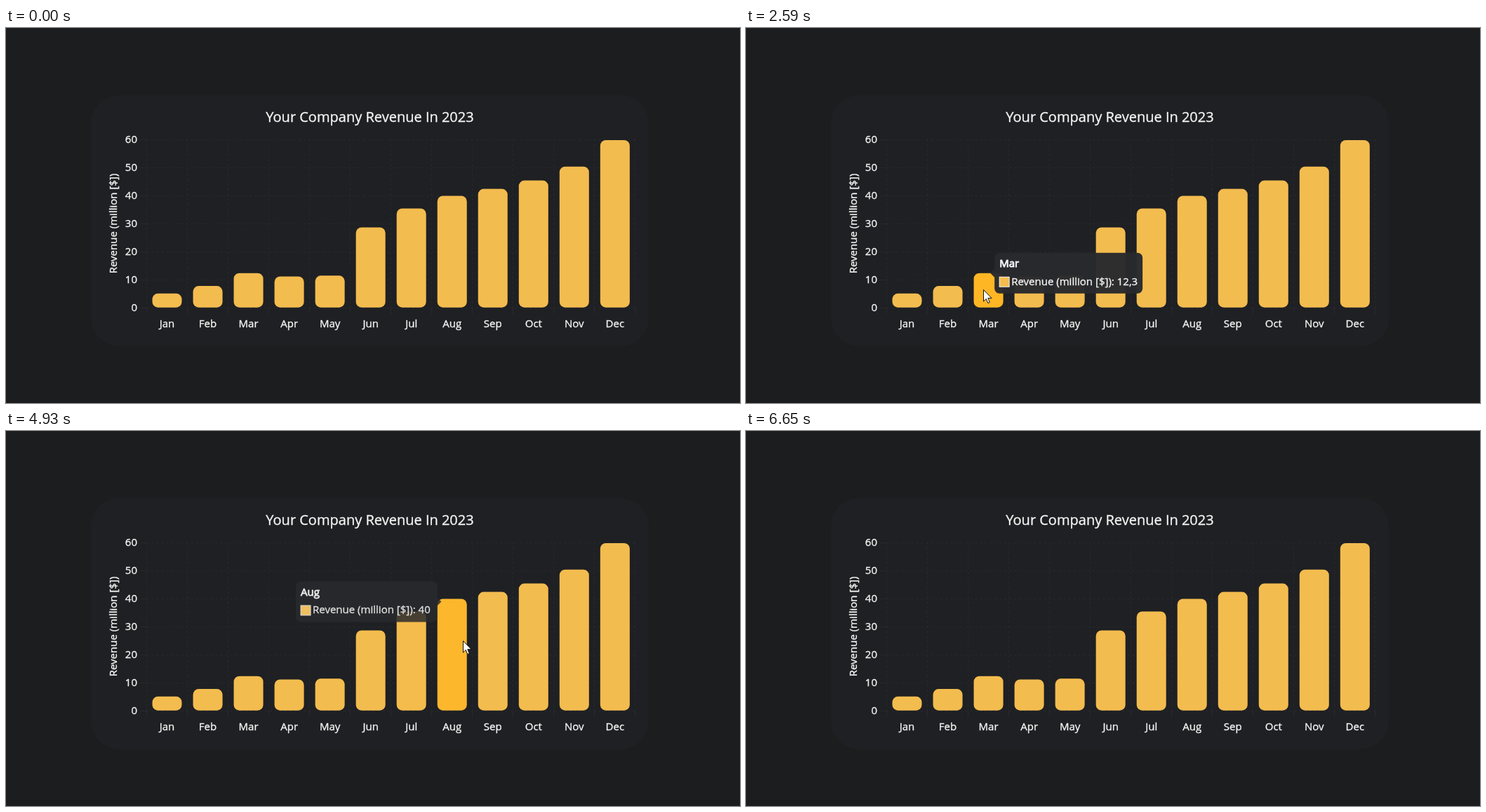
Recreate the animation shown at these times as an HTML page with a canvas. Size 1046 by 535 pixels, loop 7710 ms.

```html
<!DOCTYPE html>
<html lang="en">
<head>
<meta charset="utf-8">
<title>Revenue chart</title>
<style>
  html, body { margin: 0; width: 100%; height: 100%; overflow: hidden; background: #1c1d1e; }
  canvas { display: block; }
</style>
</head>
<body>
<canvas id="stage" width="1046" height="535"></canvas>
<script>
const ctx = document.getElementById('stage').getContext('2d');
const LOOP = 7710, TICK = 68.5;
const ENTER = 400, EXIT = 6600;
const MOVE_STARTS = [ENTER, 3140, 4710];
const FONT = '"Open Sans", "Noto Sans", sans-serif';
const LABEL = 'Revenue (million [$])';
const MONTHS = 'Jan Feb Mar Apr May Jun Jul Aug Sep Oct Nov Dec'.split(' ');
const VALUES = [5, 7.7, 12.3, 11.1, 11.4, 28.7, 35.5, 40, 42.5, 45.5, 50.5, 60];
const BASE = 398.7, LEFT = 200.5, STEP = 58.03, UNIT = 3.98;
const HALF_BAR = 21, HALF_TIP = 29, CARET_GAP = 8.6;
const BAR = [243, 188, 79], BAR_HOT = [255, 182, 36];

// Key points of the pointer: time, x, y
const PATH = [
  [400, 955, 520], [1150, 421, 467], [1750, 301, 426], [1970, 322, 396],
  [2106, 324.6, 385], [2181, 337, 374], [3140, 340, 372], [3290, 367, 349],
  [3345, 424, 301], [3500, 490, 276], [3770, 557, 276], [3893, 591, 300],
  [4710, 591, 300], [4790, 600, 299], [4915, 651, 299], [5015, 673, 300],
  [5350, 715, 306], [5395, 755, 308], [5575, 773, 307], [5669, 824, 306],
  [6060, 831, 314], [6265, 847, 328], [6560, 1001, 481]
];

const centre = i => LEFT + STEP * (i + 0.5);
const barTop = i => BASE - VALUES[i] * UNIT;
const linear = p => p;
const outQuart = p => 1 - (1 - p) ** 4;

function stepTime(t) {
  const start = MOVE_STARTS.filter(s => s <= t).pop();
  return start === undefined ? 0 : start + TICK * Math.floor((t - start) / TICK + 0.15);
}

function pointerAt(t) {
  let i = 1;
  while (i < PATH.length - 1 && PATH[i][0] < t) i++;
  const [t0, x0, y0] = PATH[i - 1], [t1, x1, y1] = PATH[i];
  const p = Math.max(0, Math.min(1, (t - t0) / (t1 - t0)));
  return [x0 + (x1 - x0) * p, y0 + (y1 - y0) * p];
}

function barUnder([x, y]) {
  return VALUES.findIndex((v, i) => Math.abs(x - centre(i)) <= HALF_BAR && y >= barTop(i) && y <= BASE);
}

// Hover changes follow from the pointer's path: [time, bar], -1 for none
const hovers = [];
for (let t = ENTER, last = -1; t < EXIT; t++) {
  const bar = barUnder(pointerAt(t));
  if (bar !== last) hovers.push([t, bar]);
  last = bar;
}
const shown = hovers.filter(([, bar]) => bar >= 0);

// Value that eases to each new target from wherever it is
function track(t, initial, changes, duration, ease) {
  let from = initial, to = initial, start = 0;
  const valueAt = time => from + (to - from) * ease(Math.min(1, (time - start) / duration));
  for (const [time, target] of changes) {
    if (time > t) break;
    if (target === to) continue;
    from = valueAt(time);
    to = target;
    start = time;
  }
  return valueAt(t);
}

function text(str, x, y, { size = 15, align = 'left', weight = 0.35 } = {}) {
  ctx.font = `${size}px ${FONT}`;
  ctx.textAlign = align;
  ctx.fillStyle = ctx.strokeStyle = '#f4f4f4';
  ctx.lineWidth = weight;
  ctx.fillText(str, x, y);
  ctx.strokeText(str, x, y);
}

function roundRect(x, y, w, h, r, fill) {
  ctx.fillStyle = fill;
  ctx.beginPath();
  ctx.roundRect(x, y, w, h, r);
  ctx.fill();
}

function line(x1, y1, x2, y2, dash) {
  ctx.setLineDash(dash);
  ctx.beginPath();
  ctx.moveTo(x1, y1);
  ctx.lineTo(x2, y2);
  ctx.stroke();
}

function drawFrame() {
  ctx.fillStyle = '#1c1d1e';
  ctx.fillRect(0, 0, 1046, 535);
  roundRect(121, 96, 795, 358, 40, '#1f2023');

  ctx.strokeStyle = '#28292c';
  ctx.lineWidth = 1;
  for (let i = 0; i <= 12; i++) {
    const x = Math.floor(LEFT + STEP * i) + 0.5;
    line(x, 159, x, 399, [3, 4]);
    line(x, 399, x, 408, []);
  }
  for (let i = 0; i <= 6; i++) {
    const y = 399.5 - 40 * i;
    line(LEFT, y, 897, y, [3, 4]);
    line(191, y, LEFT, y, []);
  }
  ctx.setLineDash([]);

  text('Your Company Revenue In 2023', 518.5, 134, { size: 20, align: 'center' });
  for (let i = 0; i <= 6; i++) text(String(i * 10), 187, 404 - 40 * i, { align: 'right' });
  MONTHS.forEach((month, i) => text(month, centre(i), 427, { align: 'center' }));
  ctx.save();
  ctx.translate(158, 279);
  ctx.rotate(-Math.PI / 2);
  text(LABEL, 0, 0, { align: 'center' });
  ctx.restore();
}

function drawBars(t) {
  VALUES.forEach((value, i) => {
    const heat = track(t, 0, hovers.map(([at, bar]) => [at, +(bar === i)]), 280, outQuart);
    const colour = BAR.map((c, k) => Math.round(c + (BAR_HOT[k] - c) * heat));
    roundRect(centre(i) - HALF_BAR, barTop(i), HALF_BAR * 2, value * UNIT, 8, `rgb(${colour})`);
  });
}

const bodyText = i => `${LABEL}: ${String(VALUES[i]).replace('.', ',')}`;

function tooltipBox(i) {
  ctx.font = `15px ${FONT}`;
  const w = ctx.measureText(bodyText(i)).width + 31;
  const x = i < 6 ? centre(i) + CARET_GAP : centre(i) - CARET_GAP - w;
  return { x, y: barTop(i) - HALF_TIP, w };
}

function drawTooltip(t) {
  const alpha = track(t, 0, hovers.map(([at, bar]) => [at, +(bar >= 0)]), 140, linear);
  if (alpha <= 0) return;
  const current = shown.filter(([at]) => at <= t).pop()[1];
  const follow = (key, initial) =>
    track(t, initial, shown.map(([at, bar]) => [at, tooltipBox(bar)[key]]), 280, outQuart);
  const x = follow('x', 454), y = follow('y', 221), w = follow('w', 211);

  ctx.save();
  ctx.globalAlpha = alpha;
  ctx.fillStyle = 'rgba(41, 42, 46, 0.97)';
  ctx.beginPath();
  ctx.roundRect(x, y, w, HALF_TIP * 2, 7);
  // The caret winds like the box so that the two fills merge
  const edge = current < 6 ? x : x + w, tip = current < 6 ? -6 : 6, middle = y + HALF_TIP;
  ctx.moveTo(edge, middle - tip);
  ctx.lineTo(edge + tip, middle);
  ctx.lineTo(edge, middle + tip);
  ctx.closePath();
  ctx.fill();

  text(MONTHS[current], x + 7, y + 20.5, { weight: 0.9 });
  text(bodyText(current), x + 24, y + 46);
  ctx.fillRect(x + 6.5, y + 34, 15, 15);
  ctx.fillStyle = `rgb(${BAR})`;
  ctx.fillRect(x + 7.5, y + 35, 13, 13);
  ctx.restore();
}

const ARROW = new Path2D('M0.5 0.5V17L4.3 13.4 6.8 19.5 9.3 18.4 6.8 12.4H12Z');

function drawPointer(t) {
  if (t < ENTER || t > EXIT) return;
  const [x, y] = pointerAt(t).map(Math.round);
  ctx.save();
  ctx.translate(x, y);
  ctx.fillStyle = '#fff';
  ctx.strokeStyle = '#111';
  ctx.lineWidth = 1;
  ctx.fill(ARROW);
  ctx.stroke(ARROW);
  ctx.restore();
}

function render(now) {
  const t = stepTime(now % LOOP);
  drawFrame();
  drawBars(t);
  drawTooltip(t);
  drawPointer(t);
}

const origin = performance.now();
function tick() {
  render(performance.now() - origin);
  requestAnimationFrame(tick);
}
tick();
</script>
</body>
</html>
```
